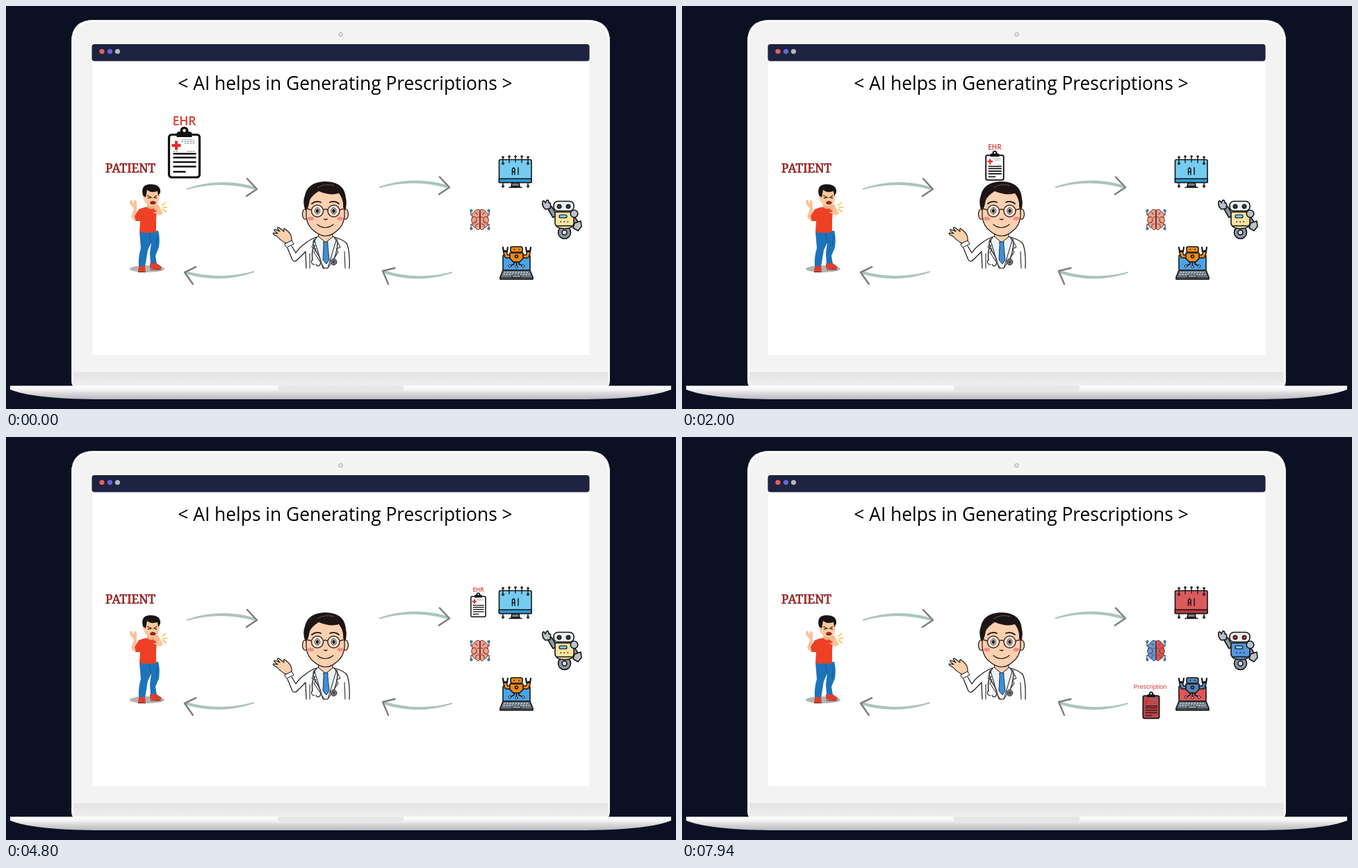
An HTML page that plays this animation: 964x581 px, repeating every 8000 ms.

```html
<!DOCTYPE html>
<html lang="en">
<head>
<meta charset="utf-8">
<title>AI helps in Generating Prescriptions</title>
<style>
html, body { margin: 0; width: 100%; height: 100%; overflow: hidden; background: #0c1023; }
svg {
  display: block; width: 964px; height: 581px;
  --monitor: #74cdf0; --base: #2f9bd6; --lobeL: #f2a08a; --lobeR: #f2a08a; --body: #fbe3a0; --eye: #3d4556;
  --screen: #4aa3ea; --bot: #ef8a17;
}
svg.alert {
  --monitor: #dc5a5c; --base: #b8393f; --lobeL: #5b9be0; --lobeR: #e2574f; --body: #5795dd; --eye: #e0393b;
  --screen: #e05658; --bot: #5684b8;
}
.title { font: 26.38px "Open Sans", sans-serif; }
.patient { font: 17.3px "Noto Serif", serif; fill: #d21f1c; stroke: #4a0c0c; stroke-width: .5px; }
.ehr { font: 600 17.3px "Open Sans", sans-serif; fill: #da3a33; }
.caption { font: 20.2px "Liberation Sans", Arial, sans-serif; fill: #bf3b38; }
.rx { font: 9px "Liberation Sans", Arial, sans-serif; fill: #d23c3a; }
text { text-anchor: middle; }
.ink { stroke: #161616; stroke-linejoin: round; stroke-linecap: round; }
.line { fill: none; }
</style>
</head>
<body>
<svg id="stage" viewBox="0 0 964 581">
  <defs>
    <linearGradient id="chin" x2="0" y2="1">
      <stop stop-color="#e3e3e4"/><stop offset="1" stop-color="#efefef"/>
    </linearGradient>
    <linearGradient id="deck" x2="0" y2="1">
      <stop stop-color="#fff"/><stop offset=".3" stop-color="#f3f3f3"/>
      <stop offset=".5" stop-color="#dedee0"/><stop offset="1" stop-color="#b9b9bf"/>
    </linearGradient>
    <path id="shaft" d="M0 0Q49-17 99-2L98 2Q49-12 0 2Z" fill="#abc5bc"/>
    <path id="head" class="line" d="M-14-15L0 0L-15 10" stroke="#7d7f7e" stroke-width="2.5" stroke-linejoin="round" stroke-linecap="round"/>
  </defs>

  <g id="computer">
    <path d="M97 549Q94 546 94 538V52Q94 20 127 20H836Q869 20 869 52V538Q869 546 866 549Z" fill="#f3f3f3"/>
    <path class="line" d="M96 540V52Q96 22 127 22H836Q867 22 867 52V540" stroke="#fff" stroke-width="2"/>
    <path class="line" d="M94.500 540V52Q94.500 20.500 127 20.500H836Q868.500 20.500 868.500 52V540" stroke="#dcdcdf"/>
    <rect x="97" y="528" width="769" height="20" fill="url(#chin)"/>
    <circle cx="481.500" cy="41" r="2.700" fill="#e8e8e8" stroke="#a9a9ad"/>
    <path d="M6 547.500H957V553Q925 566 835 567H128Q38 566 6 553Z" fill="url(#deck)"/>
    <path d="M391 547.500H572V551Q572 555 566 555H397Q391 555 391 551Z" fill="#e6e6e7"/>
    <rect x="124" y="72" width="715.500" height="431" fill="#fff"/>
    <rect x="123.500" y="55" width="716" height="24.500" rx="4" fill="#1d2340"/>
    <circle cx="138" cy="65.500" r="3.600" fill="#e8605c"/>
    <circle cx="149.500" cy="65.500" r="3.600" fill="#6468d8"/>
    <circle cx="160.500" cy="65.500" r="3.600" fill="#b5b8bf"/>
  </g>

  <text class="title" x="488" y="121">&lt; AI helps in Generating Prescriptions &gt;</text>
  <text class="patient" x="179" y="240">PATIENT</text>

  <g id="arrows">
    <use href="#shaft" x="260" y="263"/><use href="#head" x="361" y="264"/>
    <use href="#shaft" x="537" y="260.500"/><use href="#head" x="638" y="261.500"/>
    <use href="#shaft" transform="translate(357 384) rotate(180)"/>
    <use href="#head" transform="translate(257 384) rotate(188)"/>
    <use href="#shaft" transform="translate(642 385) rotate(181)"/>
    <use href="#head" transform="translate(542 382) rotate(200)"/>
  </g>

  <g id="sick">
    <ellipse cx="203" cy="379" rx="25" ry="5" fill="#b5b3b3"/>
    <path d="M192 325L219 324Q222 335 220 348L215 360L217 372H208L207 357L209 341L204 352L200 376H191Q190 362 194 349Z" fill="#1c73ba"/>
    <path class="line" d="M209 342L206 328M218 331L216 347" stroke="#165a98"/>
    <path d="M191 375L200 375L201 382Q196 385 190 383ZM207 371L217 371L224 376Q224 380 217 380L207 378Z" fill="#dc3f2e"/>
    <path d="M190 383.500H201M208 380H223" stroke="#7d1e1a"/>
    <path d="M193 304L186 311L180 304L184 292L179 286L178 281L181 279L183 285L185 279L188 282L188 296L188 302L193 297Z" fill="#f9c39a"/>
    <path d="M191 293Q201 288 211 290L217 296L216 308L216 326Q204 328 192 326L193 310L187 310L185 303Z" fill="#ee4024"/>
    <path d="M211 297L221 302L226 299L219 286L213 288L217 297Z" fill="#f9c39a"/>
    <path d="M203 284H214V291Q208 295 203 290Z" fill="#edb086"/>
    <path d="M197 266Q198 259 208 259Q221 260 221 272Q220 289 211 289Q200 288 197 276Z" fill="#f9c99f"/>
    <path d="M197 273Q193 257 208 257Q223 257 222 269L219 274L218 267Q208 270 203 265L201 276Z" fill="#191414"/>
    <path class="line" d="M203 273L209 276L204 277M217 273L213 276L217 277" stroke="#5b2418" stroke-width="1.300"/>
    <path d="M207 283Q211 279 216 283L214 286H208Z" fill="#922"/>
    <path d="M214 288Q218 283 220 290L218 296L213 293Z" fill="#f6b98d"/>
    <path class="line" d="M224 288L230 283M225 291L232 290M225 293L231 297" stroke="#f3c14b" stroke-width="1.600"/>
  </g>

  <g id="doctor">
    <path d="M416 366L432 349L446 333H472L489 341Q495 350 494 378H432L431 354L418 368Z" fill="#fff"/>
    <path class="ink line" stroke-width="1.200" d="M411 346L417 356Q422 348 431 342Q438 336 447 333M405 349L412 366Q415 370 419 366L431 354L432 378M472 333Q485 337 490 342Q495 352 494 378"/>
    <path class="ink" stroke-width="1.100" fill="#fbd0ac" d="M403 342L411 339Q412 331 406 325L401 321Q399 320 400 325L392 319Q388 319 394 325L387 322Q383 322 391 328L385 327Q382 328 390 332Q396 339 403 342Z"/>
    <path class="ink" fill="#fff" d="M401 343L411 338L414 343L404 348Z"/>
    <path class="ink" fill="#fbd0ac" d="M450 328H470V335L460 342L450 335Z"/>
    <path class="ink" fill="#edf4f9" d="M449 332L460 341L471 332L475 338L463 378H456L444 338Z"/>
    <path class="ink" stroke-width=".8" fill="#3d8fd6" d="M457 340H463L463 345L465 366L461 372L456 366L457 345Z"/>
    <path class="ink line" d="M446 334L440 348L446 350L443 355L458 378M474 334L481 348L475 350L478 355L463 378M487 354L488 378M437 357V378"/>
    <path class="line" d="M444 336Q439 342 447 355Q456 369 451 374M445 345Q439 350 441 367M476 336Q479 347 472 365" stroke="#4b4d55" stroke-width="1.800"/>
    <circle cx="471.500" cy="369" r="4.400" fill="#777a82" stroke="#222"/>
    <circle cx="471.500" cy="369" r="2" fill="#444"/>
    <path class="line" d="M440 366Q438 372 444 373M451 374Q447 376 446 372" stroke="#444" stroke-width="1.500"/>
    <g class="ink" stroke-width="1.200" fill="#fcd0b0">
      <ellipse cx="430.500" cy="300" rx="4" ry="7.500"/>
      <ellipse cx="488.500" cy="300" rx="4" ry="7.500"/>
      <path d="M432 280Q433 264 460 263Q486 264 487 280V303Q486 317 475 325Q460 338 444 325Q433 317 432 303Z"/>
    </g>
    <path d="M431 295Q426 284 430 273Q434 254 459 253Q487 253 489 277Q491 286 488 295L485 290Q486 279 479 270Q467 274 450 267Q440 273 437 280Q436 286 434 292Z" fill="#1d1515"/>
    <path class="line" d="M448 262Q459 255 472 259" stroke="#66524b"/>
    <ellipse cx="438.500" cy="306.500" rx="4.500" ry="2.800" fill="#f58d82"/>
    <ellipse cx="481" cy="306.500" rx="4.500" ry="2.800" fill="#f58d82"/>
    <g class="ink" stroke-width="1.500" style="stroke:#4a2620" fill="#fdeee2">
      <circle cx="448" cy="295.500" r="8.500"/><circle cx="471.500" cy="295.500" r="8.500"/>
      <path class="line" d="M456.500 294Q459.500 292 463 294M439.500 294L432 292M480 294L487 292"/>
    </g>
    <path class="ink line" stroke-width="1.900" d="M440 285Q446 280 453 283M466 283Q473 280 479 285"/>
    <ellipse cx="448" cy="295.500" rx="3.600" ry="4.600" fill="#fff" stroke="#20130f"/>
    <ellipse cx="471.500" cy="295.500" rx="3.600" ry="4.600" fill="#fff" stroke="#20130f"/>
    <ellipse cx="448" cy="295.500" rx="2.100" ry="3" fill="#20130f"/>
    <ellipse cx="471.500" cy="295.500" rx="2.100" ry="3" fill="#20130f"/>
    <path class="ink line" stroke-width="1.200" d="M457.500 307Q460 309 462 307M448 315Q459 324 471 315"/>
  </g>

  <g id="monitor" class="ink" stroke-width="1.600">
    <path class="line" d="M715 256V260M751 256V260"/>
    <rect x="709.500" y="221.500" width="46.500" height="33" rx="2" style="fill:var(--monitor)"/>
    <path d="M709.500 249H756V254.500H709.500Z" style="fill:var(--base)"/>
    <path fill="#777e8c" d="M728 255H738L739 260H727ZM724 261.500H742"/>
    <path class="line" stroke-width="1.300" d="M715 226V219M724 226V218M733 225V218M742 226V218M751 226V219"/>
    <path class="line" stroke-width="1.500" d="M728.500 243V235L730.300 233L732 235V243M728.500 239H732M737 233V243"/>
    <g fill="#555e72" stroke-width="1">
      <circle cx="715" cy="218" r="1.300"/><circle cx="724" cy="217" r="1.300"/><circle cx="733" cy="217" r="1.300"/>
      <circle cx="742" cy="217" r="1.300"/><circle cx="751" cy="218" r="1.300"/>
      <circle cx="715" cy="227" r="1.600"/><circle cx="751" cy="227" r="1.600"/>
      <circle cx="715" cy="260" r="1.500"/><circle cx="751" cy="260" r="1.500"/>
    </g>
  </g>

  <g id="brain">
    <path class="line" d="M669 295V301H675M695 295V301H689M669 321V315H675M695 321V315H689" stroke="#4b5563" stroke-width="1.300"/>
    <g fill="#4c91c2" stroke="#34475a" stroke-width=".8">
      <circle cx="669.500" cy="295" r="1.700"/><circle cx="694.500" cy="295" r="1.700"/>
      <circle cx="669.500" cy="321" r="1.700"/><circle cx="694.500" cy="321" r="1.700"/>
    </g>
    <path d="M681.500 294Q676 292 674 297Q669 299 671 304Q668 309 671 313Q671 319 676 320Q679 325 681.500 321Z" stroke="#5c3a38" style="fill:var(--lobeL)"/>
    <path d="M682.500 294Q688 292 690 297Q695 299 693 304Q696 309 693 313Q693 319 688 320Q685 325 682.500 321Z" stroke="#5c3a38" style="fill:var(--lobeR)"/>
    <path class="line" d="M675 298Q678 298 678 301M671 305Q676 302 677 307T672 313M681 304L678 305M676 319Q675 314 680 314M689 298Q686 298 686 301M693 305Q688 302 687 307T692 313M683 304L686 305M688 319Q689 314 684 314" stroke="#80423e" stroke-width="1.200"/>
  </g>

  <g id="robot" class="ink" stroke-width="1.600">
    <path fill="#8f98a5" d="M779 291L787 305L793 302L785 289Z"/>
    <path fill="#b9c1cb" d="M776 293Q771 289 772 282Q774 279 776 284L778 280Q781 279 781 284Q785 283 783 292Z"/>
    <path fill="#8f98a5" d="M817 302L824 313L819 317L812 308Z"/>
    <path fill="#b9c1cb" d="M818 313L827 310L828 318L823 324L816 320Z"/>
    <circle cx="803.500" cy="326.500" r="9" fill="#8c96a5"/><circle cx="803.500" cy="326.500" r="3.500" fill="#d9dfe6"/>
    <path d="M790 297H817V314Q815 321 804 321Q792 321 790 314Z" style="fill:var(--body)"/>
    <rect x="788" y="281.500" width="29" height="14" rx="6" fill="#eef0f3"/>
    <circle cx="796" cy="289" r="2.700" style="fill:var(--eye)"/><circle cx="809" cy="289" r="2.700" style="fill:var(--eye)"/>
    <circle cx="817.500" cy="299.500" r="5.300" fill="#b9c1cb"/>
    <rect x="796" y="301" width="11" height="4.500" rx="2" fill="#77c3ee" stroke-width="1.200"/>
    <path d="M798 311H798.500M803 311H803.500M808 311H808.500M793 317H814"/>
  </g>

  <g id="laptop" class="ink" stroke-width="1.600">
    <rect x="715" y="359" width="39" height="22" rx="1.500" style="fill:var(--screen)"/>
    <path fill="#68717f" d="M715 381H754L758 391V394H711V391Z"/>
    <path d="M717 384H752M716 387H753" stroke-width="1.300" stroke-dasharray="1.500 2.500" style="stroke:#d2d7df"/>
    <path fill="#b0b7c2" stroke-width="1" d="M729 388H740L741 391H728ZM711 392H758"/>
    <path d="M727 361H720L718 355M742 361H750L752 355" class="line" stroke-width="6"/>
    <path d="M727 361H720L718 355M742 361H750L752 355" class="line" style="stroke:var(--bot)" stroke-width="3.200"/>
    <path d="M715 348L716 354H721L722 348M748 348L749 354H754L755 348" class="line" stroke-width="2.200"/>
    <g style="fill:var(--bot)">
      <path d="M725 356H744V364L739 369H730L725 364Z"/>
      <rect x="726" y="347" width="17" height="8" rx="2.500"/>
      <circle cx="734.500" cy="361" r="2"/>
    </g>
    <path class="line" d="M731 351H731.500M738 351H738.500M734.500 369V376M731 369V372L725 375M738 369V372L744 375"/>
    <g fill="#dfe5ec" stroke-width="1"><circle cx="725" cy="375" r="1.700"/><circle cx="734.500" cy="376" r="1.700"/><circle cx="744" cy="375" r="1.700"/></g>
  </g>

  <g id="clipboard">
    <text id="ehr" class="ehr" y="-39">EHR</text>
    <rect id="paper" x="-22" y="-25.500" width="44" height="61.500" rx="4" stroke="#111" stroke-width="3.200"/>
    <path d="M-11-22V-27Q-11-30-6-30Q-6-37 0-37Q6-37 6-30Q11-30 11-27V-22Z" fill="#111"/>
    <circle cy="-31.500" r="2.200" fill="#fff"/>
    <path d="M-13.500-16.500H-9.500V-12H-5V-8H-9.500V-3.500H-13.500V-8H-18V-12H-13.500Z" fill="#e32d28"/>
    <path d="M-4-18H14M-4-15.500H16M0-13H15M-16-1.500H-8M4-1.500H16" stroke="#7c8a91" stroke-width="1" stroke-dasharray="3 1"/>
    <path id="rows" class="line" d="M-16 2H17M-16 7.500H17M-16 14H17M-16 20.500H17M-16 28H2" stroke-width="2.700"/>
  </g>
  <text id="rx" class="rx" x="673.500" y="363">Prescription</text>
  <g id="caption" class="caption">
    <text x="735" y="431">AI Generating</text>
    <text x="735" y="453">Prescription</text>
  </g>
</svg>
<script>
const LOOP = 8000;
const CENTER = [733, 295.5, .58];
// start, x, y, scale, paper, rows, parts shown
const steps = [
  [0, 256.5, 211, 1, '#fff', '#111', 'ehr'],
  [500, 303, 211, 1, '#fff', '#111', 'ehr'],
  [1000, 349, 235, .78, '#fff', '#111', 'ehr'],
  [1500, 395, 259, .57, '#fff', '#111', 'ehr'],
  [2000, 450, 230, .58, '#fff', '#111', 'ehr'],
  [2800, 504.5, 258, .6, '#fff', '#111', 'ehr'],
  [3300, 541, 232, .81, '#fff', '#111', 'ehr'],
  [3800, 578.5, 207, 1.03, '#fff', '#111', 'ehr'],
  [4300, 628, 225, .75, '#fff', '#111', 'ehr'],
  [4800, 679.5, 242, .48, '#fff', '#111', 'ehr'],
  [5300, ...CENTER, '#fff', '#111', 'caption'],
  [5960, ...CENTER, '#f6a5a5', '#7d2b2d', 'caption'],
  [6620, ...CENTER, '#dc6b6b', '#641c20', 'caption alert'],
  [7280, ...CENTER, '#b84a4c', '#4a1518', 'caption alert'],
  [7940, 675, 386.6, .53, '#b84a4c', '#4a1518', 'rx alert']
];
const el = id => document.getElementById(id);
const stage = el('stage');
let shown;

function render(step) {
  const [, x, y, scale, paper, rows, parts] = step;
  const has = parts.split(' ');
  el('clipboard').setAttribute('transform', `translate(${x} ${y}) scale(${scale})`);
  el('paper').style.fill = paper;
  el('rows').style.stroke = rows;
  for (const id of ['ehr', 'caption', 'rx'])
    el(id).style.display = has.includes(id) ? '' : 'none';
  stage.classList.toggle('alert', has.includes('alert'));
}

function tick() {
  const t = performance.now() % LOOP;
  const step = steps.findLast(s => s[0] <= t);
  if (step !== shown) render(shown = step);
  requestAnimationFrame(tick);
}
tick();
</script>
</body>
</html>
```
